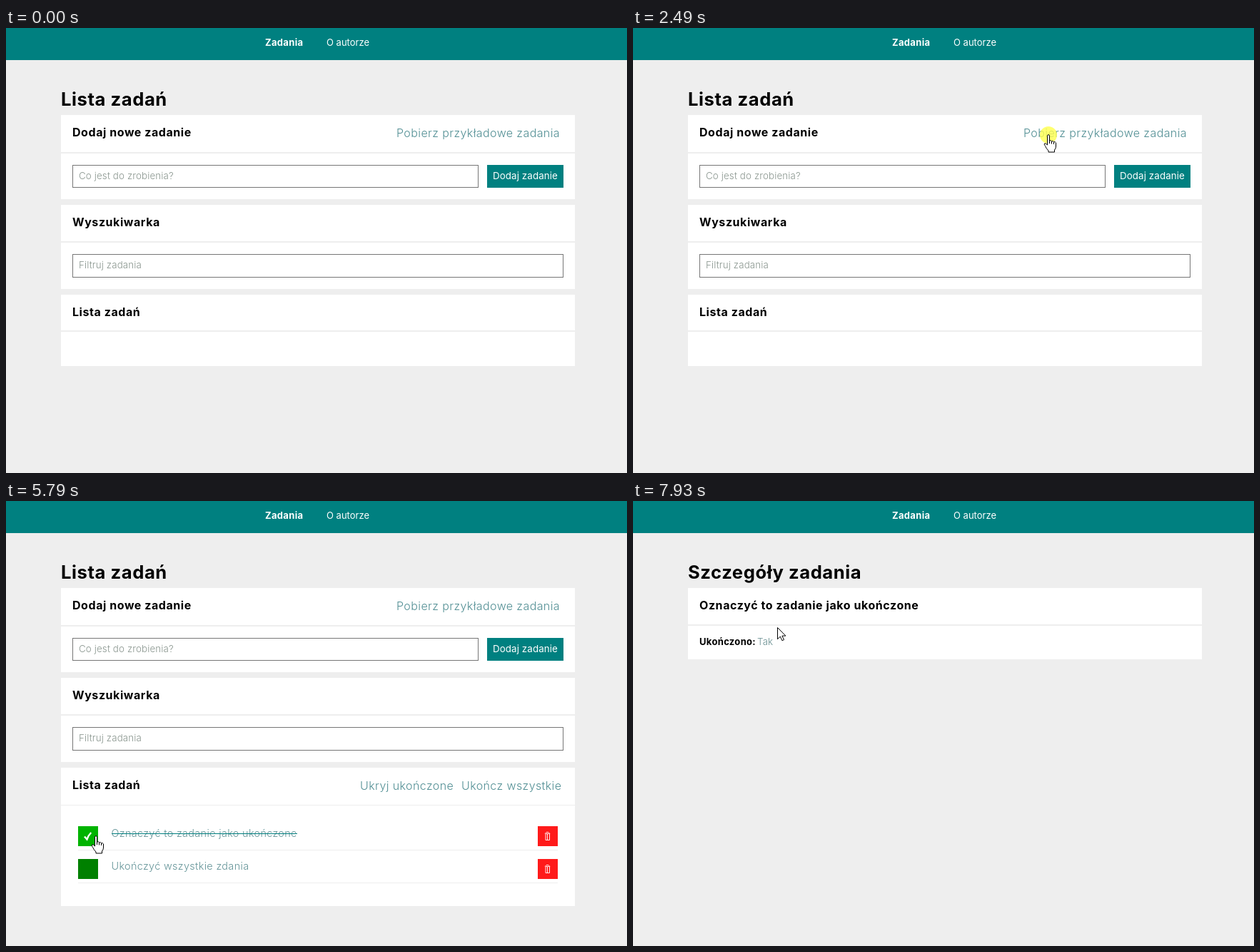
An HTML page that plays this animation: 870x624 px, repeating every 8 s.

```html
<!DOCTYPE html>
<html lang="pl">
<head>
<meta charset="utf-8">
<title>Lista zadań</title>
<style>
  html, body { margin: 0; width: 100%; height: 100%; overflow: hidden; background: #eee; }
  svg { display: block; font-family: Inter, "Open Sans", sans-serif; font-optical-sizing: none; }
  .h1, .h2, .b { font-weight: 700; letter-spacing: .035em; }
  .h1 { font-size: 25.6px; letter-spacing: .022em; }
  .h2 { font-size: 16px; }
  .b { font-size: 13px; letter-spacing: .025em; }
  .nav { font-size: 13px; fill: #fff; }
  .link, .hint, .item { font-weight: 300; }
  .link { font-size: 16px; letter-spacing: .025em; fill: #528f94; }
  .hint { font-size: 13.33px; letter-spacing: .01em; fill: #8a968f; }
  .item { font-size: 14.4px; letter-spacing: .024em; fill: #649498; }
  .button { font-size: 13.33px; letter-spacing: .008em; fill: #fff; }
  .panel { fill: #fff; }
  .field { fill: #fff; stroke: #767676; }
  .rule { fill: #eee; }
  .cursor { fill: #fff; stroke: #000; stroke-linejoin: round; }
</style>
</head>
<body>
<svg width="870" height="624" viewBox="0 0 870 624">
  <defs>
    <g id="bin">
      <rect width="28" height="28" fill="#ff1a1a"/>
      <path d="M11 10.5h5.5v9H11zM10 10.5l2-2h3l2 2M13.5 11v8" fill="none" stroke="#fff" stroke-width=".9"/>
    </g>
  </defs>
  <rect width="870" height="45" fill="#008080"/>
  <text class="nav b" x="363" y="25">Zadania</text>
  <text class="nav" x="449" y="25">O autorze</text>

  <g id="listPage">
    <text class="h1" x="77" y="109">Lista zadań</text>
    <path class="panel" d="M77 122h720v52H77zM77 176h720v64H77zM77 248h720v51H77zM77 301h720v65H77z"/>
    <text class="h2" x="93" y="152">Dodaj nowe zadanie</text>
    <text class="link" id="fetch" x="547" y="153">Pobierz przykładowe zadania</text>
    <g id="spinner"></g>
    <rect class="field" x="93.5" y="192.5" width="568" height="31"/>
    <text class="hint" x="102" y="212">Co jest do zrobienia?</text>
    <rect id="add" x="674" y="192" width="107" height="32"/>
    <text class="button" x="682" y="212">Dodaj zadanie</text>
    <text class="h2" x="93" y="278">Wyszukiwarka</text>
    <rect class="field" x="93.5" y="317.5" width="687" height="32"/>
    <text class="hint" x="102" y="337">Filtruj zadania</text>
    <path class="panel" id="tasksPanel"/>
    <text class="h2" x="93" y="404">Lista zadań</text>
    <g id="tasks">
      <text class="link" x="496" y="405">Ukryj ukończone</text>
      <text class="link" x="638" y="405">Ukończ wszystkie</text>
      <path class="rule" d="M101 489h672v1H101zM101 535h672v1H101z"/>
      <rect id="box" x="101" y="456" width="28" height="28"/>
      <rect x="101" y="502" width="28" height="28" fill="#008000"/>
      <text class="item" id="task" x="147.5" y="471">Oznaczyć to zadanie jako ukończone</text>
      <text class="item" x="147.5" y="517">Ukończyć wszystkie zdania</text>
      <use href="#bin" x="745" y="456"/>
      <use href="#bin" x="745" y="502"/>
      <g id="done">
        <path d="M110 470.5l3.4 4q2.2-6 5.8-9.5" fill="none" stroke="#fff" stroke-width="2.4"/>
        <rect x="148" y="466" width="260" height="1" fill="#008080"/>
      </g>
    </g>
  </g>

  <g id="detailPage">
    <text class="h1" x="77" y="109">Szczegóły zadania</text>
    <path class="panel" d="M77 122h720v51H77zM77 175h720v47H77z"/>
    <text class="h2" x="93" y="152">Oznaczyć to zadanie jako ukończone</text>
    <text class="b" x="93" y="202">Ukończono:</text>
    <text class="hint" x="174" y="202" style="fill:#6d9294">Tak</text>
  </g>

  <g id="pointer">
    <circle id="click" r="12" fill="#ffff4d" fill-opacity=".8"/>
    <path class="cursor" id="arrow" d="M.5 .5v16.2l3.8-3.6 2.6 5.6 2.6-1.1-2.6-5.5h5z"/>
    <path class="cursor" id="hand" d="M-1.5 13V1.2a1.5 1.5 0 0 1 3 0V8q2-1 3 .8q2-.8 3 .9q2-.6 3 1.2V16q0 3-2 5v3H0v-2q-3-3-4.5-6.5q-2-2.5-1-3.5q1.6-1 4 2zM1.5 8v4M4.5 9v3.5M7.5 10v3"/>
  </g>
</svg>
<script>
const $ = id => document.getElementById(id);
const show = (id, on) => $(id).style.display = on ? '' : 'none';
const clamp = v => Math.max(0, Math.min(1, v));

const ENTER = 190, LOADING = 2630, LOADED = 3740, DONE = 5650, DETAILS = 7390;
const clicks = [2490, 5580, 7250], CLICK_LENGTH = 140;

// Each move bends towards "via" and slows down as it reaches "to"
const start = [838, 618];
const moves = [
  { from: ENTER, until: 950, via: [770, 260], to: [755, 202] },
  { from: 1020, until: 1590, via: [620, 0], to: [513, 45] },
  { from: 1590, until: 2200, via: [485, 115], to: [582, 150] },
  { from: 3960, until: 4450, via: [400, 150], to: [310, 318] },
  { from: 4450, until: 5080, via: [240, 420], to: [126, 470] },
  { from: 6800, until: 7200, via: [165, 462], to: [218, 461] },
  { from: 7600, until: 7930, via: [250, 400], to: [202, 177] }
];

function pointerAt(t) {
  let at = start;
  for (const { from, until, via, to } of moves) {
    if (t < from) break;
    const k = clamp((t - from) / (until - from)), u = k * (2 - k), v = 1 - u;
    at = at.map((p, i) => v * v * p + 2 * u * v * via[i] + u * u * to[i]);
  }
  return at.map(Math.round);
}

function isOver(id, [x, y]) {
  const b = $(id).getBBox();
  return x >= b.x && x < b.x + b.width && y >= b.y && y < b.y + b.height;
}

// Highlight that fades in and out
const hover = (t, from, to) => clamp((t - from) / 200) * (1 - clamp((t - to) / 200));

for (let i = 0; i < 8; i++) {
  $('spinner').innerHTML += `<path d="M0-4.3A4.3 4.3 0 0 1 3.04-3.04" transform="rotate(${i * 45})"
    fill="none" stroke="#008080" stroke-width="3" opacity="${.08 + i * .085}"/>`;
}

function draw(now) {
  const t = now % 8000, at = pointerAt(t);
  const loading = t >= LOADING && t < LOADED, loaded = t >= LOADED;

  show('listPage', t < DETAILS);
  show('detailPage', t >= DETAILS);
  show('fetch', !loading);
  show('spinner', loading);
  $('spinner').setAttribute('transform', `translate(770 147) rotate(${(t - LOADING) * .36})`);
  show('tasks', loaded);
  show('done', t >= DONE);
  $('tasksPanel').setAttribute('d', loaded
    ? 'M77 374h720v52H77zM77 427h720v141H77z'
    : 'M77 374h720v50H77zM77 426h720v48H77z');

  const teal = 128 + 25 * hover(t, 700, 1050);
  $('add').setAttribute('fill', `rgb(0 ${teal} ${teal})`);
  $('box').setAttribute('fill', `rgb(0 ${128 + 51 * hover(t, 5130, 6870)} 0)`);

  const hand = ['add', 'fetch', 'box', 'task'].some(id => isOver(id, at));
  show('pointer', t >= ENTER);
  show('hand', hand);
  show('arrow', !hand);
  show('click', clicks.some(c => t >= c && t < c + CLICK_LENGTH));
  $('pointer').setAttribute('transform', `translate(${at})`);
  requestAnimationFrame(draw);
}
draw(0);
</script>
</body>
</html>
```
